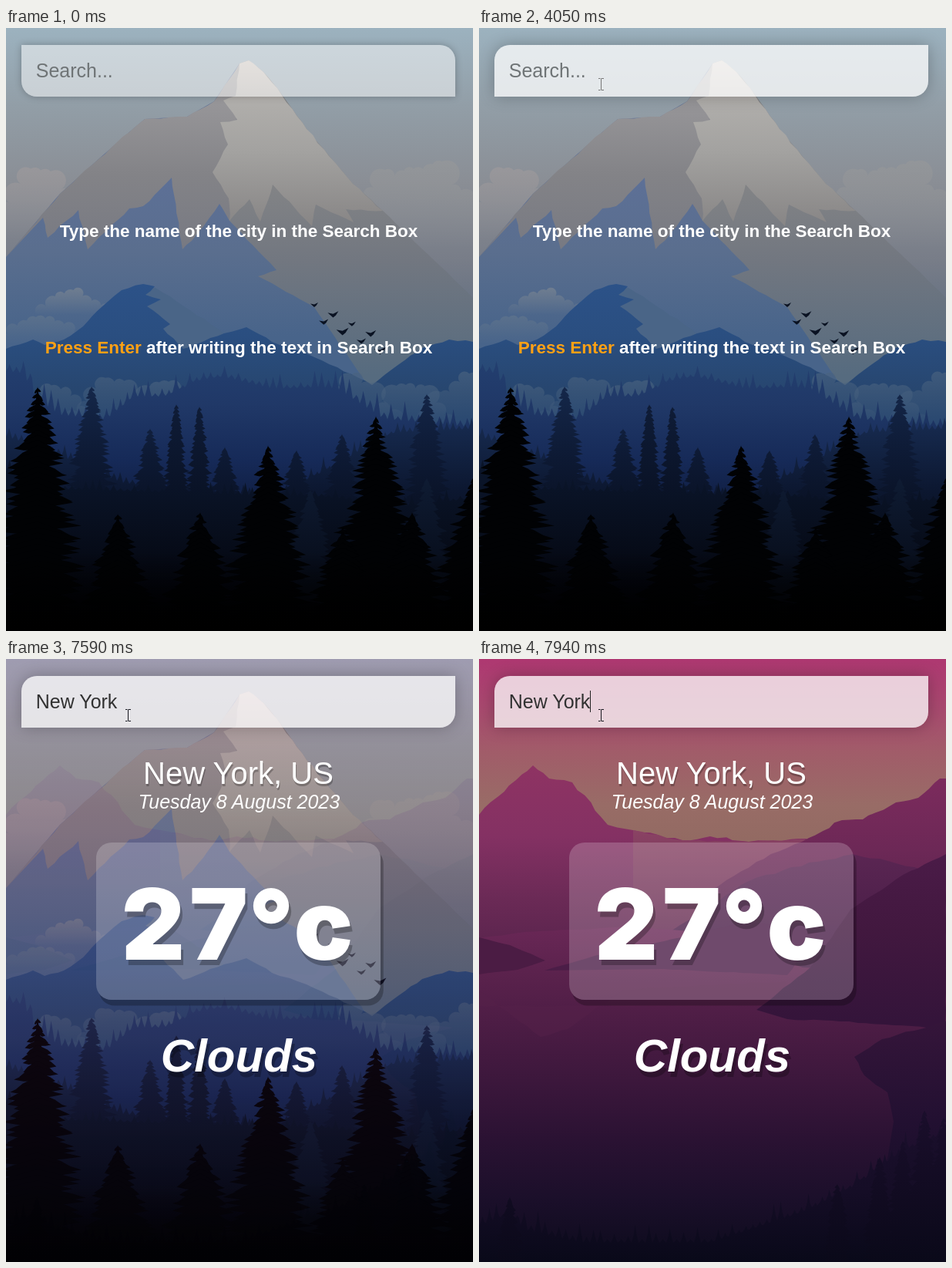
Write an HTML page that moves like this. It is 606x782 px and loops after 8000 ms.

```html
<!DOCTYPE html>
<html lang="en">
<head>
<meta charset="utf-8">
<title>Weather search</title>
<style>
  html, body { margin: 0; width: 100%; height: 100%; overflow: hidden; background: #000; }
  #stage { position: relative; width: 606px; height: 782px; overflow: hidden; }
  #stage > * { position: absolute; }
  svg { left: 0; top: 0; font-family: "Liberation Sans", Arial, sans-serif; }
  #search { left: 20px; top: 22px; width: 563px; height: 67px; }
  #panel { left: 117px; top: 238px; width: 369px; height: 204px; border-radius: 20px;
    background: rgba(255,255,255,.2); box-shadow: 3.75px 7.5px rgba(0,0,0,.25); }
  .light { filter: drop-shadow(1.25px 3.75px 0 rgba(0,0,0,.25)); }
  .heavy { filter: drop-shadow(3.75px 7.5px 0 rgba(0,0,0,.25)); }
</style>
</head>
<body>
<div id="stage">
  <svg width="606" height="782" viewBox="0 0 606 782">
    <defs id="defs"></defs>
    <g id="alpine"></g>
    <g id="dusk"></g>
  </svg>
  <div id="search"></div>
  <div id="panel"></div>
  <svg width="606" height="782" viewBox="0 0 606 782">
    <text id="query" x="38.75" y="64" font-size="25" xml:space="preserve"></text>
    <rect id="caret" y="41" width="1" height="28" fill="#222"/>
    <g id="hint" font-size="22.5" font-weight="700" fill="#fff" text-anchor="middle">
      <text x="302" y="271">Type the name of the city in the Search Box</text>
      <text x="302" y="422"><tspan fill="#ffa114">Press Enter</tspan> after writing the text in Search Box</text>
    </g>
    <g id="result" fill="#fff" text-anchor="middle">
      <text class="light" x="301.5" y="162" font-size="40">New York, US</text>
      <text x="302.5" y="194" font-size="25" font-style="italic">Tuesday 8 August 2023</text>
      <text class="heavy" x="191 276 344 412" y="390" font-size="127.5" font-weight="900" font-family="Inter, sans-serif">27°c</text>
      <text class="heavy" x="302.5" y="535" font-size="60" font-weight="700" font-style="italic">Clouds</text>
    </g>
    <path id="arrow" d="M.5.5V16.5L4.3 13 7 19 9.3 18 6.7 12H11.5Z" fill="#fff" stroke="#000"/>
    <path id="beam" d="M-3-7.5h2.5M.5-7.5H4M-3 7.5h2.5M.5 7.5H4M.5-7V7" fill="none"/>
  </svg>
</div>
<script>
const $ = id => document.getElementById(id);
const W = 606, H = 782;

let seed = 7;
const rnd = () => (seed = seed * 16807 % 2147483647) / 2147483647;
const lerp = (a, b, k) => a + (b - a) * k;
const clamp = k => Math.min(1, Math.max(0, k));
const range = n => [...Array(n).keys()];

// "x,y x,y" to pairs of numbers
const points = text => text.split(' ').map(p => p.split(',').map(Number));

// Vertical gradient in stage units from pairs of y and colour
let gradients = 0;
function fade(...stops) {
  const id = 'fade' + gradients++;
  const top = stops[0][0], span = stops[stops.length - 1][0] - top;
  $('defs').insertAdjacentHTML('beforeend',
    `<linearGradient id="${id}" gradientUnits="userSpaceOnUse" x1="0" x2="0" y1="${top}" y2="${top + span}">` +
    stops.map(([y, c]) => `<stop offset="${(y - top) / span}" stop-color="${c}"/>`).join('') + '</linearGradient>');
  return `url(#${id})`;
}

const polygon = (pts, fill) => `<path d="M${pts.map(p => p.map(v => v.toFixed(1)).join(' ')).join('L')}Z" fill="${fill}"/>`;
const ground = (y, fill) => polygon([[0, y], [W, y], [W, H], [0, H]], fill);

// Splits every edge and shakes the new points
function roughen(line, amount) {
  return line.flatMap((a, i) => {
    const b = line[i + 1];
    if (!b) return [a];
    const n = Math.ceil(Math.hypot(b[0] - a[0], b[1] - a[1]) / 12);
    return range(n).map(k => a.map((v, axis) => lerp(v, b[axis], k / n) + (k && (rnd() - .5) * amount)));
  });
}

const rock = (outline, rough, fill) => polygon(roughen(points(outline), rough), fill);

// Land under a skyline, down to the bottom of the stage
function land(skyline, rough, fill) {
  const line = points(skyline);
  return polygon([...roughen(line, rough), [line[line.length - 1][0], H], [line[0][0], H]], fill);
}

function woods(skyline, size, step, fill) {
  const line = points(skyline), pts = [[-step, H]];
  for (let x = -step; x <= W + step; x += step) {
    const i = Math.max(1, line.findIndex(p => p[0] >= Math.min(x, W)));
    const [a, b] = [line[i - 1], line[i]];
    const y = lerp(a[1], b[1], clamp((x - a[0]) / (b[0] - a[0])));
    const h = size * (.2 + rnd() ** 2);
    pts.push([x, y], [x + step * .3, y - h * .45], [x + step * .5, y - h], [x + step * .75, y - h * .4]);
  }
  return polygon([...pts, [W + step, H]], fill);
}

// A tapering core with single drooping branches on both sides
function conifer(x, top, base, half, step, fill) {
  let out = polygon([[x, top], [x + half * .5, lerp(top, base, .75)], [x + half * .5, base], [x - half * .5, base], [x - half * .5, lerp(top, base, .75)]], fill);
  for (let y = top + 4; y < base; y += step * .8) {
    const t = (y - top) / (base - top);
    for (const side of [-1, 1]) {
      const reach = side * (2 + half * Math.min(1, t * 1.5) ** .8 * (.72 + rnd() * .4));
      const drop = step * (.2 + rnd() * .9), thick = Math.min(step, 2 + t * step * 2);
      out += polygon([[x, y - thick], [x + reach * .7, y + drop * .4 - thick * .2], [x + reach, y + drop],
        [x + reach * .6, y + drop + thick * .35], [x, y + thick]], fill);
    }
  }
  return out;
}
const forest = (tips, base, half, step, fill) =>
  points(tips).map(([x, top]) => conifer(x, top, base, half + (base - top) * .09, step, fill)).join('');

function cloud(x, y, w, h, color) {
  const n = Math.ceil(w / 13);
  const arcs = range(n).map(i => {
    const k = (i + 1) / n, r = w / n * (.55 + rnd() * .3);
    return `A${r} ${r} 0 0 1 ${x + w * k} ${y - h * Math.sin(Math.PI * k) * (.7 + rnd() * .3)}`;
  });
  return `<path d="M${x} ${y}${arcs.join('')}Z" fill="${fade([y - h, color + 'b0'], [y, color + '00'])}"/>`;
}

function bird(i) {
  const x = 400 + 12.2 * i, y = 359 + 6.2 * i + i % 2 * 16, s = 5 + i % 4;
  return polygon([[x - s, y - s * .3], [x, y - s * .1], [x + s, y - s * .6], [x + s * .5, y + s * .2], [x, y + s * .6]], '#0a1222');
}

function drawAlpine() {
  const leftRidge = '0,297 70,215 120,170 160,135 180,118 235,115 270,95 303,46';
  const rightRidge = '315,42 334,57 352,78 390,131 450,202 489,237';
  const crest = '303,46 298,88 282,94 300,119 278,122 288,151 268,187 289,221 290,250';
  const mist = '#49627f';
  return [
    ground(0, fade([0, '#9cb2bf'], [100, '#929ea7'], [200, '#8a8e95'], [300, '#787d88'], [400, '#5d6c80'], [480, '#465a78'])),
    cloud(-20, 275, 130, 105, '#a09b9c'), cloud(430, 285, 210, 130, '#979899'), cloud(500, 400, 160, 50, '#6d7987'),
    // Great peak: shaded flank, lit flank, then the two snow fields
    rock(`${leftRidge} 330,200 480,480 0,480`, 0, fade([190, '#5d7097'], [290, '#5a6e8e'], [400, '#48648a'])),
    rock(`${rightRidge} 606,350 606,470 474,470 400,362 355,337 327,322 351,314 290,250 303,46`, 1, fade([200, '#838486'], [300, '#727780'], [450, '#566b7f'])),
    rock(`${leftRidge} 300,100 290,250 277,228 241,276 229,287 215,194 178,231 160,234 106,287 94,236 54,272 48,246`, 2,
      fade([45, '#a5a3a2'], [100, '#969598'], [190, '#838387'], [290, '#777982'])),
    rock(`${crest} 316,222 330,251 346,203 397,257 402,229 451,252 441,235 489,237 ${points(rightRidge).reverse().join(' ')}`, 2,
      fade([40, '#ccc4bd'], [95, '#b0aeab'], [160, '#a3a2a0'], [250, '#898787'])),
    cloud(40, 372, 95, 36, '#7d8792'), cloud(-10, 410, 110, 45, '#65788d'),
    // Blue foothills
    land('178,333 194,337 275,390 330,430', 2, '#4a6587'),
    land('0,416 35,404 50,411 75,404 100,387 125,361 150,340 178,332 193,335 181,346 201,352 183,361 213,384 204,390 230,416 265,402 312,388 345,407 390,422 430,440 475,463 510,436 540,415 575,404 606,407', 2,
      fade([330, '#2c5288'], [400, '#2a4e80'], [470, '#27466f'])),
    ...range(6).map(i => cloud(10 + i % 3 * 70 + (i > 2) * 390, 520, 110, 65 + i % 2 * 10, mist)),
    // Forests, far to near
    woods('0,445 22,448 40,482 70,502 130,508 165,478 205,478 245,458 280,452 345,468 405,466 430,468 490,507 606,518',
      22, 9, fade([430, '#233f70'], [490, '#203867'], [560, '#162a58'], [640, '#0d1838'])),
    woods('0,530 60,550 150,590 300,605 365,598 430,565 500,525 606,520',
      18, 8, fade([510, '#172b50'], [600, '#0c1730'], [690, '#060b17'], [782, '#000'])),
    forest('111,464 546,474 187,519 284,543 377,547 436,526', 640, 14, 6, fade([460, '#15284b'], [560, '#0d1933'], [660, '#070d1c'])),
    forest('221,487 251,490', 640, 2, 6, fade([480, '#0f1d39'], [640, '#080f20'])),
    woods('0,575 70,598 310,606 400,607 520,620 606,610', 14, 9, fade([590, '#0a1428'], [660, '#070d1b'], [730, '#03050e'], [782, '#000'])),
    forest('546,583 395,598', 740, 18, 7, fade([580, '#0f1c34'], [720, '#060b17'])),
    forest('41,465 340,541 480,503 145,630 252,628 437,648 527,628 608,580', 770, 32, 9, '#010204'),
    ground(680, fade([680, '#0000'], [755, '#000d'], [782, '#000'])),
    ...range(8).map(bird)
  ].join('');
}

function drawDusk() {
  return [
    ground(0, fade([0, '#ae3871'], [60, '#a8486f'], [120, '#a15c69'], [190, '#986c66'], [240, '#926a62'])),
    land('0,202 48,157 70,138 91,155 121,160 167,215 200,222 264,235 300,230 350,237 425,233', 3,
      fade([135, '#8f3363'], [230, '#843163'], [310, '#6b2a56'], [380, '#59244d'])),
    land('200,222 264,235 350,237 425,234 450,260', 2, fade([220, '#8b4364'], [360, '#612950'])),
    land('300,300 360,263 428,232 471,209 498,208 541,186 570,180 598,155 606,155', 3,
      fade([155, '#7c2b5d'], [250, '#6c2856'], [370, '#4c2047'])),
    land('230,365 350,288 405,270 485,253 565,270 606,280', 3, fade([250, '#5b2653'], [350, '#4a1e48'], [430, '#3f193f'])),
    // Lake with its spits of land
    land('0,362 60,354 200,347 310,356 420,400 606,400', 1,
      fade([340, '#6b2857'], [420, '#58214b'], [520, '#42193f'], [620, '#2b1233'], [700, '#1b0f2a'], [782, '#0c0b1c'])),
    rock('0,430 80,490 115,480 187,429 400,418 380,450 0,450', 2, '#5520487f'),
    rock('0,361 40,371 86,391 50,403 0,409', 1, '#4b1c44'),
    rock('85,404 150,385 240,366 350,340 440,355 400,410 240,402', 1, '#4b1d47'),
    rock('360,455 430,400 482,325 550,280 606,253 606,480 480,470 400,467', 2, fade([250, '#4b1b48'], [350, '#42183f'], [470, '#34143a'])),
    rock('606,470 523,493 487,516 500,540 530,562 538,600 520,700 606,700', 2, fade([470, '#35153a'], [600, '#221031'], [700, '#160e27'])),
    woods('0,735 38,720 60,740 130,757 300,757 420,717 470,692 555,635 606,613', 24, 9, fade([600, '#1b0f2c'], [690, '#150d26'], [782, '#090919'])),
    forest('578,584 603,594 520,645 550,624 465,680 40,697', 782, 8, 7, fade([590, '#1a0e2b'], [782, '#0a0919']))
  ].join('');
}

$('alpine').innerHTML = drawAlpine();
$('dusk').innerHTML = drawDusk();

// Pointer strokes: time span and the three points of a quadratic curve
const strokes = [
  [310, 450, '451,543 400,250 360,0'],
  [710, 1460, '344,10 110,180 130,362'],
  [1540, 2290, '130,362 0,555 496,442'],
  [2290, 2560, '496,442 406,162 284,156'],
  [2830, 3300, '284,156 205,115 158,73']
].map(([from, to, curve]) => ({ from, to, curve: points(curve) }));

function pointerAt(t) {
  const { from, to, curve: [a, b, c] } = strokes.filter(s => t >= s.from).pop() || strokes[0];
  const k = clamp((t - from) / (to - from));
  return a.map((v, i) => lerp(lerp(v, b[i], k), lerp(b[i], c[i], k), k));
}

const city = 'New York';
const keyTimes = [5060, 5150, 5240, 5330, 5970, 6080, 6190, 6590];
const focusTime = 3500, blink = 530, answerTime = 7590;
const show = (id, on) => { $(id).style.display = on ? '' : 'none'; };

function render(t) {
  const focus = clamp((t - 3450) / 500);
  const f = focus * focus * (3 - 2 * focus);
  const search = $('search').style;
  search.borderRadius = `${20 * f}px ${20 * (1 - f)}px`;
  search.background = `rgba(255,255,255,${lerp(.5, .75, f)})`;
  search.boxShadow = `0 0 ${lerp(10, 20, f)}px rgba(0,0,0,.25)`;

  const pressed = keyTimes.filter(k => t >= k);
  const query = $('query');
  query.textContent = city.slice(0, pressed.length) || 'Search...';
  query.setAttribute('fill', pressed.length ? '#313131' : '#6f7476');
  $('caret').setAttribute('x', pressed.length ? Math.floor(38.75 + query.getComputedTextLength()) : 39);
  const lastInput = pressed.pop() || focusTime;
  show('caret', t >= focusTime && Math.floor((t - lastInput) / blink) % 2 === 0);

  const done = t >= answerTime;
  $('dusk').style.opacity = done ? 1 - (1 - clamp((t - answerTime + 40) / 390)) ** 1.7 : 0;
  show('hint', !done);
  show('result', done);
  show('panel', done);

  // The pointer moves at a coarse, regular rate
  const [x, y] = pointerAt(320 + 70 * Math.floor((t - 320) / 70)).map(Math.round);
  const visible = t >= 310 && t < 450 || t >= 710;
  const inField = x > 20 && x < 583 && y > 22 && y < 89;
  show('arrow', visible && !inField);
  show('beam', visible && inField);
  for (const id of ['arrow', 'beam']) $(id).setAttribute('transform', `translate(${x} ${y})`);
  $('beam').setAttribute('stroke', done ? '#181820' : '#777');
}

const start = performance.now();
function tick(now) {
  render(Math.max(0, now - start) % 8000);
  requestAnimationFrame(tick);
}
render(0);
requestAnimationFrame(tick);
</script>
</body>
</html>
```
